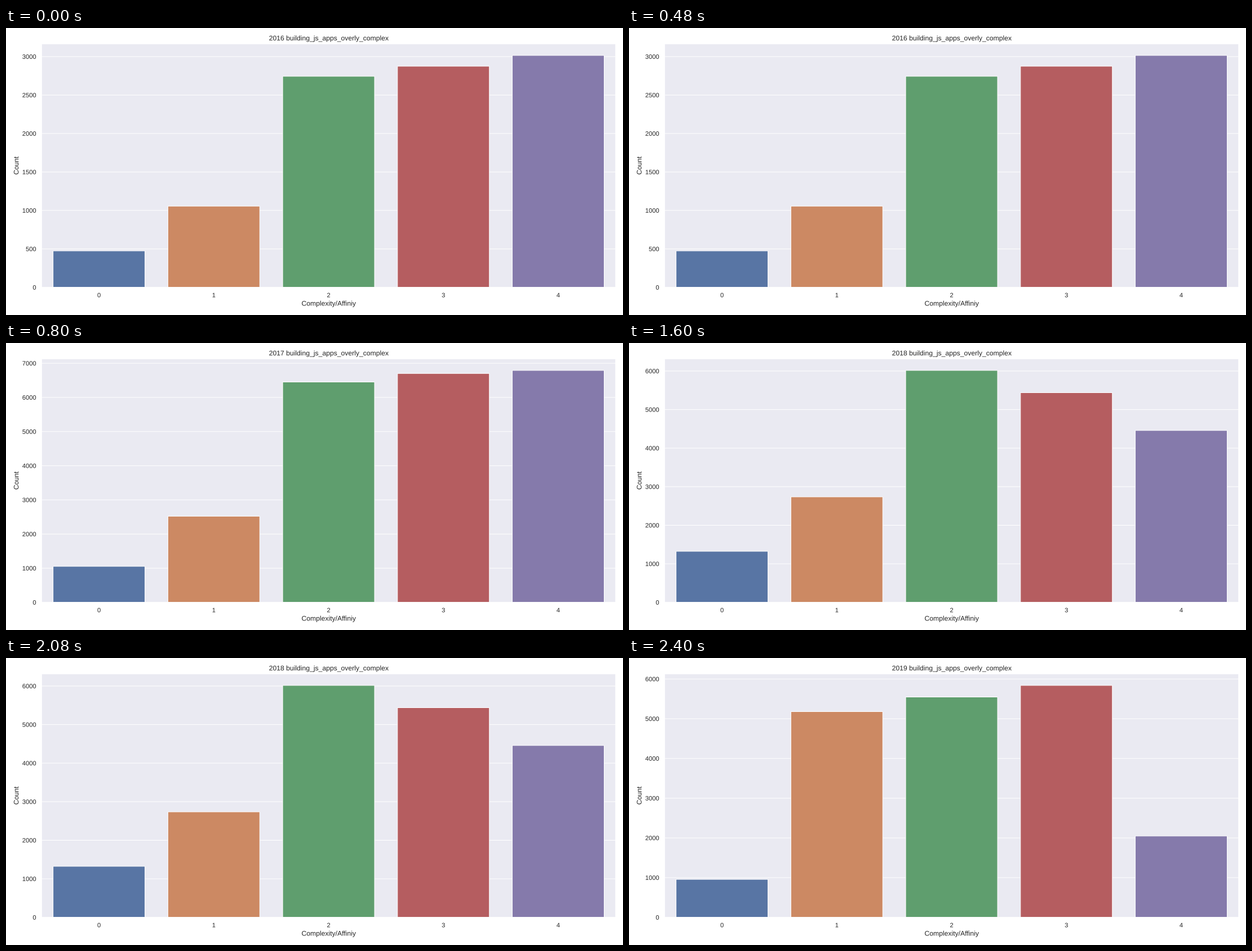
Write a matplotlib script that moves like this. It is 1095x511 px and loops after 3.2 s.

```python
import matplotlib.pyplot as plt
from matplotlib.animation import FuncAnimation
from matplotlib.patheffects import Normal

W, H, DPI = 1095, 511, 73
LEFT, RIGHT, TOP, BOTTOM = 63.2, 1081.9, 28.2, 461.8  # plot area in pixels
INK, PANEL = "#262626", "#eaeaf2"
COLORS = ["#5875a4", "#cc8963", "#5f9e6e", "#b55d60", "#857aab"]

# Survey answers per rating 0-4, one row per year
FIRST_YEAR = 2016
COUNTS = [
    [474, 1056, 2744, 2875, 3015],
    [1054, 2522, 6451, 6701, 6790],
    [1324, 2736, 6015, 5438, 4458],
    [957, 5179, 5546, 5838, 2048],
]

plt.rcParams.update({
    "font.family": "Liberation Sans",
    "text.hinting": "no_hinting",
    "text.color": INK,
    "axes.labelcolor": INK,
    "axes.labelsize": 12,
    "axes.titlesize": 12,
    "path.snap": False,
    "path.effects": [Normal()],  # text as outlines, placed between pixels
})

fig = plt.figure(figsize=(W / DPI, H / DPI), dpi=DPI, facecolor="white")
ax = fig.add_axes([LEFT / W, 1 - BOTTOM / H,
                   (RIGHT - LEFT) / W, (BOTTOM - TOP) / H], facecolor=PANEL)
ax.set_axisbelow(True)
ax.grid(axis="y", color="white", lw=1)
ax.tick_params(length=0, pad=9.5, labelsize=11, labelcolor=INK)
for spine in ax.spines.values():
    spine.set(color="white", linewidth=1.25)

ratings = range(len(COLORS))
bars = ax.bar(ratings, [0 for _ in ratings], width=0.8, color=COLORS,
              edgecolor="white", linewidth=1)
ax.set_xlim(-0.5, len(COLORS) - 0.5)
ax.set_xticks(ratings)
ax.set_xlabel("Complexity/Affiniy")
ax.set_ylabel("Count")
title = ax.set_title("", pad=6)


def update(i):
    counts = COUNTS[i]
    for bar, count in zip(bars, counts):
        bar.set_height(count)
    ax.set_ylim(0, max(counts) * 1.05)
    title.set_text(f"{FIRST_YEAR + i} building_js_apps_overly_complex")
    return [*bars, title]


anim = FuncAnimation(fig, update, frames=len(COUNTS), interval=800,
                     repeat=True, repeat_delay=0, blit=False)
plt.show()
```
